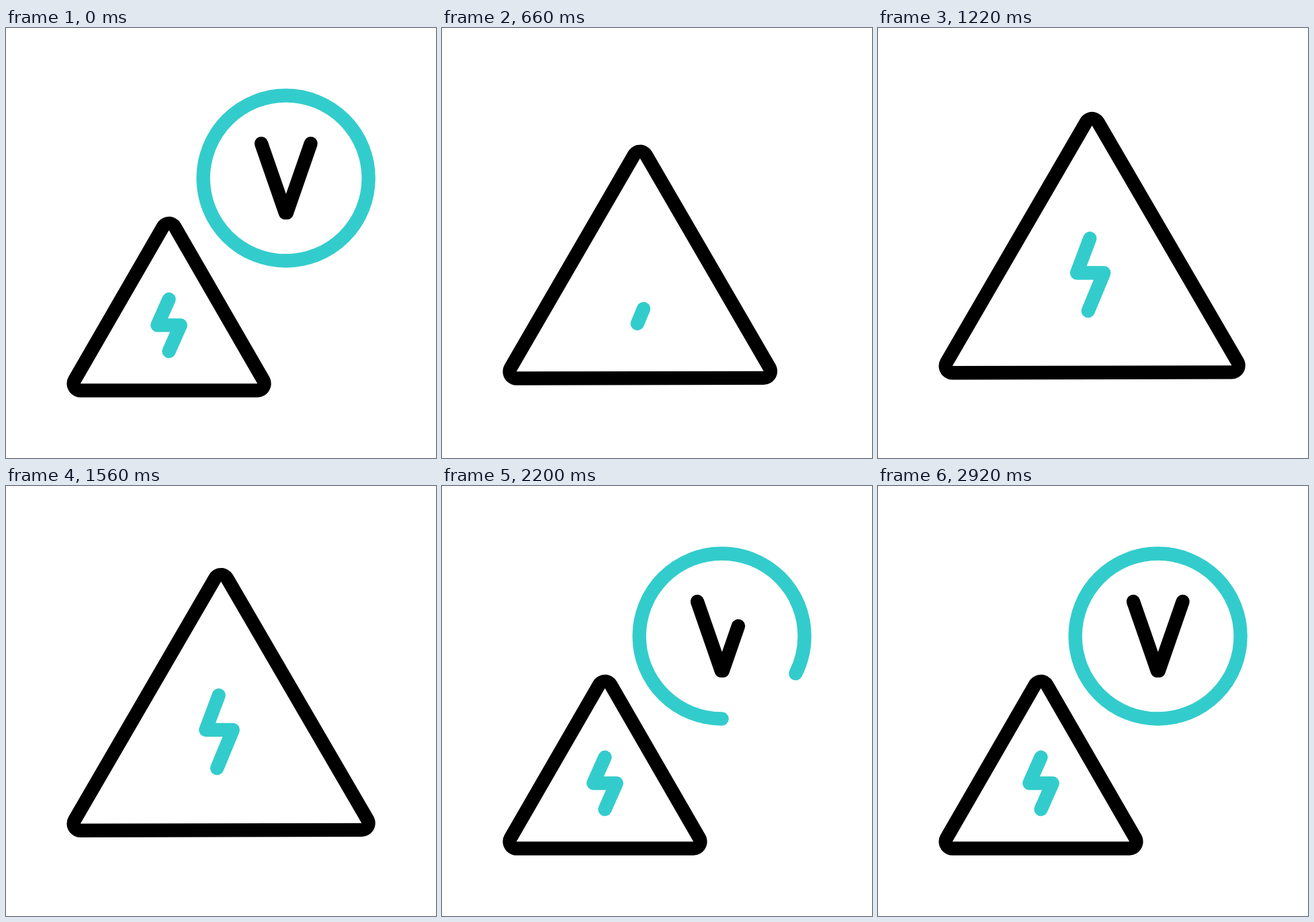
An HTML page with a canvas that plays this animation: 640x640 px, repeating every 3.62 s.

```html
<!DOCTYPE html>
<html lang="en">
<head>
<meta charset="utf-8">
<title>Voltage warning</title>
<style>
html, body { margin: 0; width: 100%; height: 100%; overflow: hidden; background: #fff; }
canvas { display: block; width: 640px; height: 640px; }
</style>
</head>
<body>
<canvas id="stage" width="640" height="640"></canvas>
<script>
const ctx = document.getElementById('stage').getContext('2d');
const LOOP = 3620, STEP = 20, LINE = 20.4;
const TEAL = '#33cccc', BLACK = '#000';

const clamp = v => Math.min(1, Math.max(0, v));
const lerp = (a, b, k) => a + (b - a) * k;

// Ease with horizontal tangents; a and b are the handles' x values
function ease(x, a, b) {
  if (x <= 0 || x >= 1) return clamp(x);
  let lo = 0, hi = 1, s;
  for (let i = 0; i < 40; i++) {
    s = (lo + hi) / 2;
    const r = 1 - s;
    if (3 * r * r * s * a + 3 * r * s * s * b + s * s * s < x) lo = s;
    else hi = s;
  }
  return s * s * (3 - 2 * s);
}

const rush = (f, start, span) => ease((f - start) / span, 2 / 3, 0);
const even = (f, start, span) => ease((f - start) / span, 2 / 3, 1 / 3);
const ramp = (f, start) => clamp((f - start) / 3);

function trace(points) {
  ctx.beginPath();
  points.forEach(([x, y]) => ctx.lineTo(x, y));
}

// Strokes the first part (0 to 1) of a polyline
function drawLine(points, part, color, alpha) {
  let length = 0;
  for (let i = 1; i < points.length; i++) {
    length += Math.hypot(points[i][0] - points[i - 1][0], points[i][1] - points[i - 1][1]);
  }
  ctx.globalAlpha = alpha;
  ctx.strokeStyle = color;
  ctx.setLineDash(part < 1 ? [Math.max(0.01, length * part), length * 2] : []);
  trace(points);
  ctx.stroke();
  ctx.setLineDash([]);
  ctx.globalAlpha = 1;
}

function drawRing(part, alpha) {
  ctx.globalAlpha = alpha;
  ctx.strokeStyle = TEAL;
  ctx.beginPath();
  ctx.arc(416.6, 223.5, 123, Math.PI / 2, Math.PI * (0.5 + 2 * Math.max(0.0001, part)));
  ctx.stroke();
  ctx.globalAlpha = 1;
}

function drawTriangle(grow) {
  const left = 110.8, width = lerp(263.4, 418.5, grow);
  const base = lerp(529.3, 502.6, grow), height = lerp(228.2, 360.3, grow);
  trace([[left, base], [left + width / 2, base - height], [left + width, base - 0.9 * grow]]);
  ctx.closePath();
  ctx.lineWidth = LINE * 2;
  ctx.strokeStyle = BLACK;
  ctx.stroke();
  ctx.fillStyle = '#fff';
  ctx.fill();
  ctx.lineWidth = LINE;
}

function drawBolt(grow, part, alpha) {
  const x = lerp(242.5, 317.5, grow), y = lerp(442.4, 363, grow);
  const half = lerp(17.2, 20.2, grow);
  const up = lerp(38.7, 51.5, grow), down = lerp(38.7, 57, grow);
  const tilt = 3.4 * grow;
  drawLine([[x - tilt, y + down], [x + half, y], [x - half, y], [x - tilt / 4, y - up]], part, TEAL, alpha);
}

function drawLetter(part, alpha) {
  const x = 416.8, wide = 36.8, tip = 1.1, top = 172, bottom = 274.8;
  drawLine([[x - wide, top], [x - tip, bottom], [x + tip, bottom], [x + wide, top]], part, BLACK, alpha);
}

function draw(f) {
  ctx.fillStyle = '#fff';
  ctx.fillRect(0, 0, 640, 640);
  ctx.lineCap = ctx.lineJoin = 'round';

  const grow = rush(f, 1.6, 75.4) - even(f, 78, 32);
  drawTriangle(grow);

  const fresh = f >= 40;
  drawBolt(grow, fresh ? even(f, 40, 20) : 1 - even(f, 20, 20), fresh ? ramp(f, 40) : 1 - ramp(f, 37));

  const back = f >= 60;
  const part = back ? rush(f, 91.3, 37.5) : 1 - even(f, 2, 30);
  const alpha = back ? ramp(f, 93) : 1 - ramp(f, 29);
  drawRing(part, alpha);
  drawLetter(part, alpha);
}

const begin = performance.now();
function tick() {
  const t = (performance.now() - begin) % LOOP;
  draw(Math.floor(t / STEP));
  requestAnimationFrame(tick);
}
tick();
</script>
</body>
</html>
```
